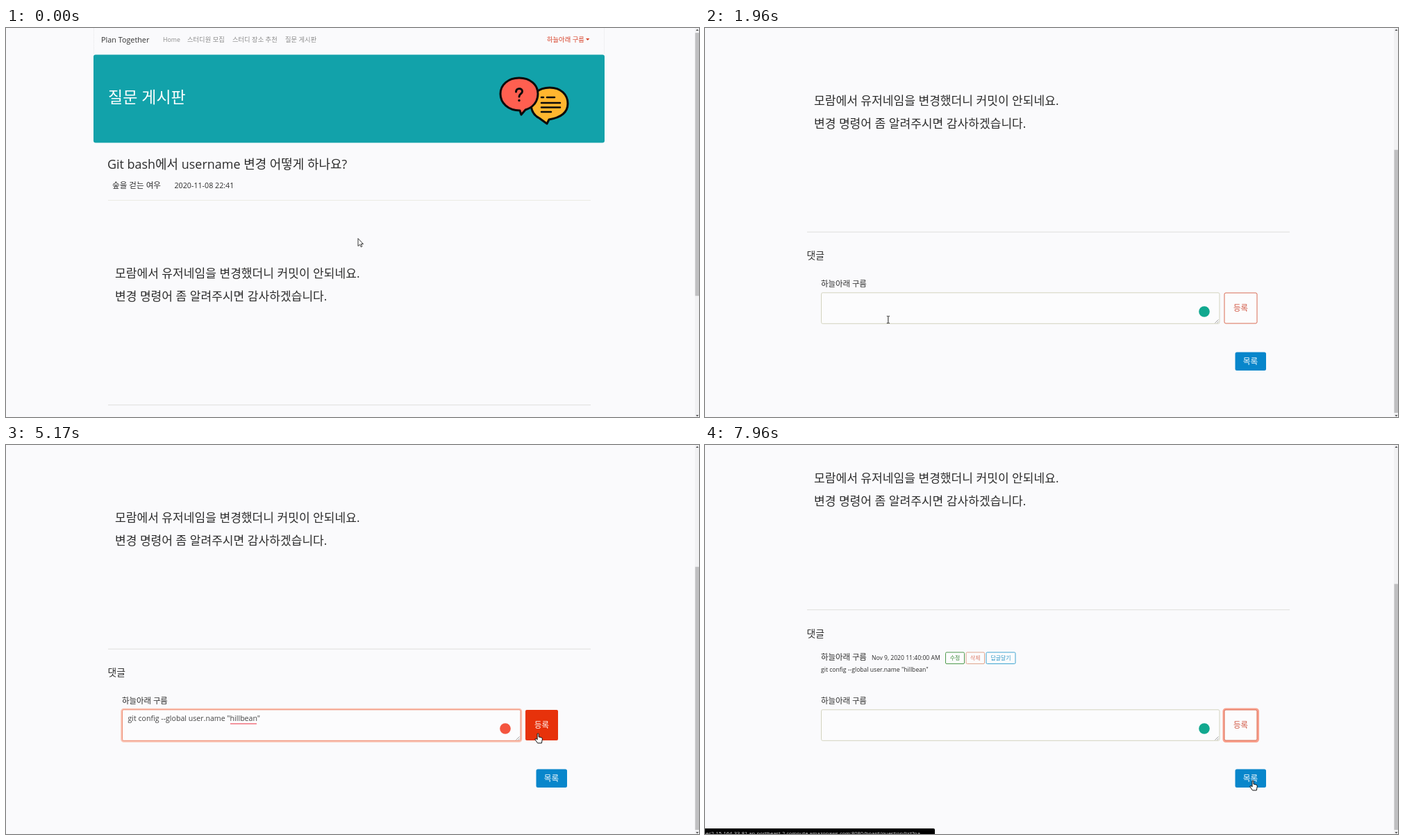
Write an HTML page that moves like this. It is 998 by 561 pixels and loops after 8 s.

```html
<!DOCTYPE html>
<html lang="ko">
<head>
<meta charset="utf-8">
<title>질문 게시판</title>
<style>
  html, body { margin: 0; width: 100%; height: 100%; overflow: hidden; }
  body { background: #fafafc; }
  svg { display: block; width: 998px; height: 561px; }
  text { font-family: 'Open Sans', 'Noto Sans CJK KR', 'Noto Sans CJK', sans-serif; fill: #2c2c2c; white-space: pre; }
  .nav text { fill: #8c8c8c; font-size: 9.3px; }
  .mid { text-anchor: middle; }
  .small rect { fill: #fcfcfd; }
  .small text { font-size: 7.9px; }
</style>
</head>
<body>
<svg viewBox="0 0 998 561">
  <g id="page">
    <path d="M126.5 0V38M861.5 0V38" stroke="#e6e6e8" stroke-dasharray="1 1"/>
    <g class="nav">
      <text x="137" y="21" style="font-size:10.8px;fill:#333">Plan Together</text>
      <text x="226" y="20" style="font-size:8.8px">Home</text>
      <text x="261" y="20">스터디원 모집</text>
      <text x="326" y="20">스터디 장소 추천</text>
      <text x="402" y="20">질문 게시판</text>
      <text x="779" y="20" style="fill:#d8432a">하늘아래 구름</text>
      <path d="M835 15h5.4l-2.7 3z" fill="#d8432a"/>
    </g>

    <rect x="126" y="38.500" width="736" height="127" rx="3" fill="#12a2aa"/>
    <text x="147" y="108" font-size="23" style="fill:#fff;font-weight:300">질문 게시판</text>
    <g stroke="#0b0b0b" stroke-width="3" stroke-linejoin="round" stroke-linecap="round">
      <path d="M783 86C799 86 809 96 809 109C809 121 800 129 782 132L779 138L768 130C760 126 756 118 756 109C756 96 767 86 783 86Z" fill="#ffb62f"/>
      <path d="M739 72C755 72 766 82 766 95C766 107 758 115 748 118L742 125L740 119C723 119 712 108 712 95C712 82 723 72 739 72Z" fill="#ff5f50"/>
      <path d="M771 100h3M779 100h11M771 108h27M771 114.500h27M771 121h14" stroke-width="2.500"/>
      <path d="M734.500 92C734.500 86 743.500 86 743.500 91.500C743.500 95 739 95 739 99" fill="none"/>
      <path d="M739 104.500v.1" stroke-width="3.500"/>
    </g>

    <text x="146" y="202.500" font-size="17.95">Git bash에서 username 변경 어떻게 하나요?</text>
    <text x="153" y="231" font-size="11.6">숲을 걷는 여우</text>
    <text x="242.500" y="231" font-size="10.7">2020-11-08 22:41</text>
    <path d="M147 248.500H842" stroke="#eaeae4"/>
    <text x="157" y="360" font-size="17.1">모람에서 유저네임을 변경했더니 커밋이 안되네요.</text>
    <text x="157" y="393" font-size="17.1">변경 명령어 좀 알려주시면 감사하겠습니다.</text>
    <path d="M147 543.700H842" stroke="#dededc"/>
    <text x="146.500" y="582.500" font-size="13.8">댓글</text>

    <g id="comment">
      <text x="167" y="616" font-size="11.4">하늘아래 구름</text>
      <text x="240" y="616" font-size="8.6">Nov 9, 2020 11:40:00 AM</text>
      <text x="167" y="633" font-size="8.6" id="posted"></text>
      <g class="small mid">
        <rect x="346.500" y="605" width="27" height="16.500" rx="1.500" stroke="#4f9a4c"/>
        <text x="360" y="616" style="fill:#3f8a3c">수정</text>
        <rect x="376" y="605" width="26.500" height="16.500" rx="1.500" stroke="#dfa48c"/>
        <text x="389.300" y="616" style="fill:#dd7f6b">삭제</text>
        <rect x="405" y="605" width="42" height="16.500" rx="1.500" stroke="#3fa4d0"/>
        <text x="426" y="616" style="fill:#2b95c6">답글달기</text>
      </g>
    </g>

    <g id="form">
      <text x="167" y="622.500" font-size="11.4">하늘아래 구름</text>
      <rect id="areaGlow" x="166.500" y="630.500" width="575.500" height="46.500" rx="3" fill="none" stroke="#fac4b4" stroke-width="2.500"/>
      <rect id="area" x="167.500" y="631.300" width="573.500" height="44.500" rx="2" fill="#fcfcfd"/>
      <path d="M734.500 675l5-5M737.500 675l2-2" stroke="#888" stroke-width=".8"/>
      <text id="typed" x="175.500" y="647.500" font-size="10.6" style="fill:#444"></text>
      <path id="caret" d="M0 638v11" stroke="#222"/>
      <path id="underline" d="M323 651.500h38" stroke="#f0727f" stroke-width="1.500"/>
      <circle id="helper" cx="719" cy="658.500" r="7.800"/>
      <rect id="sendGlow" x="747" y="630.500" width="49.500" height="46.500" rx="3" fill="none" stroke="#f9a18e" stroke-width="3"/>
      <rect id="send" x="748" y="631.500" width="47" height="44" rx="2"/>
      <text id="sendText" class="mid" x="771.500" y="657.500" font-size="11.4">등록</text>
      <rect x="763.500" y="717" width="44.500" height="26.500" rx="2.500" fill="#0886cb"/>
      <text class="mid" x="785.500" y="734.500" font-size="11.6" style="fill:#fff">목록</text>
    </g>
  </g>

  <path d="M992 0h6V561h-6z" fill="#f1f1f3"/>
  <rect id="thumb" x="992.500" width="5.500" fill="#bfbfc1"/>
  <path d="M993.500 4l2-2.500 2 2.500zM993.500 558l2 2.500 2-2.500z" fill="#555"/>

  <g id="status">
    <path d="M0 553H329q2 0 2 2V561H0z" fill="#000"/>
    <text x="1" y="562.500" font-size="7.5" style="fill:#ddd">ec2-15-164-33-81.ap-northeast-2.compute.amazonaws.com:8080/board/question/list?pa…</text>
  </g>

  <g id="cursor">
    <path id="arrow" d="M0 0V11L2.500 8.700L4.300 12.300L5.900 11.500L4.200 8H7.500Z" fill="#fff" stroke="#222" stroke-width=".9"/>
    <path id="beam" d="M-2 -5h1.500l.5.500l.5-.500H2M0 -4.500V4.500M-2 5h1.500l.5-.500l.5.500H2" fill="none" stroke="#222"/>
    <path id="hand" d="M-1 1C-1 -.5 1 -.5 1 1V5L5 6Q6.500 6.500 6.300 8L5.300 14H-.5L-4 9Q-4.500 7.300 -2.800 7.500L-1 9Z" fill="#fff" stroke="#111"/>
  </g>
</svg>
<script>
const LOOP = 8000, VIEW = 561, GROWTH = 56.5, MAX_SCROLL = 249.5;
const FOCUS = 3050, TYPE_FROM = 3350, TYPE_TO = 4500, POST = 5500;
const COMMAND = 'git config --global user.name "hillbean"';
const scrollKeys = [[90, 0], [460, 118.5], [900, MAX_SCROLL]];
const mouseX = [[0, 507], [460, 529], [650, 529], [1030, 265], [1900, 265], [2700, 195], [4550, 195], [5080, 766], [5900, 769], [6950, 769], [7650, 789]];
const mouseY = [[0, 303.5], [650, 303.5], [1030, 421], [1900, 421], [2700, 400], [4550, 400], [5080, 416], [5900, 414], [6950, 414], [7650, 484]];

const $ = id => document.getElementById(id);
const show = (id, on) => $(id).style.display = on ? '' : 'none';
const set = (id, attrs) => { for (const k in attrs) $(id).setAttribute(k, attrs[k]); };

function track(keys, t, ease = p => p) {
  const i = keys.findIndex(k => k[0] > t);
  if (i < 0) return keys[keys.length - 1][1];
  if (i === 0) return keys[0][1];
  const [t0, a] = keys[i - 1], [t1, b] = keys[i];
  return a + (b - a) * ease((t - t0) / (t1 - t0));
}
const smooth = p => p * p * (3 - 2 * p);

$('posted').textContent = COMMAND;

function draw(t) {
  const posted = t >= POST, growth = posted ? GROWTH : 0;
  const scroll = track(scrollKeys, t) + growth;
  const x = track(mouseX, t, smooth), y = track(mouseY, t, smooth);
  const formY = y + scroll - growth;
  const over = (x0, y0, x1, y1) => x >= x0 && x <= x1 && formY >= y0 && formY <= y1;
  const onArea = over(167, 631, 741, 676);
  const onSend = over(748, 631, 796, 676);
  const onList = over(763, 717, 808, 744);

  set('page', { transform: `translate(0 ${-scroll})` });
  set('form', { transform: `translate(0 ${growth})` });
  show('comment', posted);

  const rail = 548, height = VIEW + MAX_SCROLL + growth;
  set('thumb', { y: 7 + rail * scroll / height, height: rail * VIEW / height });

  const focused = t >= FOCUS && t < POST - 120;
  const part = Math.min(1, Math.max(0, (t - TYPE_FROM) / (TYPE_TO - TYPE_FROM)));
  const text = posted ? '' : COMMAND.slice(0, Math.round(part * COMMAND.length));
  $('typed').textContent = text;
  show('areaGlow', focused);
  set('area', { stroke: focused ? '#ee8a70' : '#d3d3be' });
  show('caret', focused && t < 4700);
  set('caret', { transform: `translate(${176 + (text ? $('typed').getComputedTextLength() : 0)} 0)` });
  const flagged = t >= 4750 && !posted;
  show('underline', flagged);
  show('helper', t >= 1700);
  set('helper', { fill: flagged ? '#f4553f' : '#11a88f' });

  show('sendGlow', t >= POST - 120);
  set('send', { fill: onSend ? '#e7320b' : '#fcfcfd', stroke: onSend ? 'none' : '#d96c55' });
  $('sendText').style.fill = onSend ? '#fff' : '#d05540';

  show('status', onList);
  set('cursor', { transform: `translate(${x} ${y})` });
  show('hand', onSend || onList);
  show('beam', onArea);
  show('arrow', !onArea && !onSend && !onList);
}

function tick() {
  draw(performance.now() % LOOP);
  requestAnimationFrame(tick);
}
tick();
</script>
</body>
</html>
```
